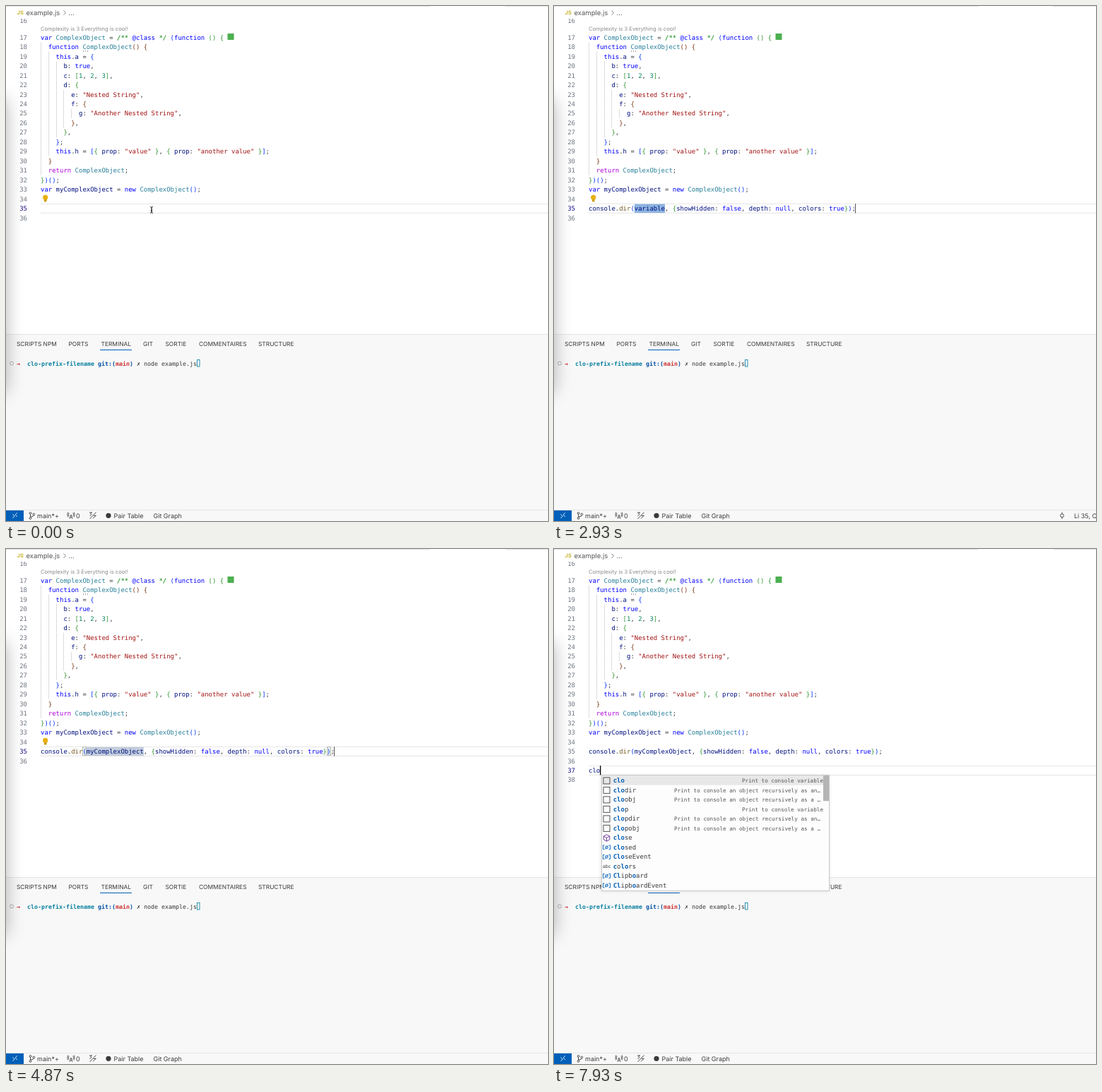
Recreate the animation shown at these times as an HTML page with a canvas. Size 767 by 730 pixels, loop 8000 ms.

```html
<!DOCTYPE html>
<html lang="en">
<head>
<meta charset="utf-8">
<title>Code editor: logging snippets</title>
<style>
  html, body { margin: 0; width: 100%; height: 100%; overflow: hidden; background: #fff; }
  canvas { display: block; }
</style>
</head>
<body>
<canvas id="stage" width="767" height="730"></canvas>
<script>
const ctx = document.getElementById('stage').getContext('2d');
const W = 767, H = 730, LOOP = 8000;
const LEFT = 49, CHAR = 5.4, LINE = 13.46, ROW = 13.5, SIZE = 8.97;
const INK = '#3b3b3b', GREY = '#6e7681', BLUE = '#0000ff', ACCENT = '#005fb8';
const BRACKETS = ['#0431fa', '#319331', '#7b3814'];

const SOURCE = `var ComplexObject = /** @class */ (function () {
  function ComplexObject() {
    this.a = {
      b: true,
      c: [1, 2, 3],
      d: {
        e: "Nested String",
        f: {
          g: "Another Nested String",
        },
      },
    };
    this.h = [{ prop: "value" }, { prop: "another value" }];
  }
  return ComplexObject;
})();
var myComplexObject = new ComplexObject();`.split('\n');

// Timelines: [start in ms, value]
const TYPED = [[0, ''], [130, 'c'], [270, 'cl'], [400, 'clo'], [600, 'clod'], [730, 'clodi'], [870, 'clodir'],
  [1400, 'variable'], [3000, 'm'], [3200, 'my'], [3400, 'myC'], [3930, 'myComplexObject']];
const TYPED_AGAIN = [[0, ''], [7000, 'c'], [7270, 'cl'], [7400, 'clo']];
const CARET = [[0, 0], [130, 1], [1270, 0], [3000, 1], [4400, 0], [4930, 1], [5330, 0], [5670, 1], [6130, 0], [6470, 1]];
const POPUP = [[0, null], [470, ['clo', 67]], [670, ['dir', 71]], [800, ['dir', 76]], [930, ['dir', 82]],
  [1400, null], [3270, ['my', 126]], [3470, ['myC', 131]], [3930, null], [7530, ['clo', 67]]];
const INSERT = 1400, EDIT = 3000, LEAVE = 5670, ENTER1 = 6470, ENTER2 = 6670;

// Suggestions: icon, label with *matched* parts, detail
const VARIABLE = 'Print to console variable';
const AS_AN = 'Print to console an object recursively as an…';
const AS_A = 'Print to console an object recursively as a …';
const MINE = ['var', '*myC*omplexObject', 'var myComplexObject: ComplexObject'];
const LISTS = {
  clo: [
    ['box', '*clo*', VARIABLE], ['box', '*clo*dir', AS_AN], ['box', '*clo*obj', AS_A],
    ['box', '*clo*p', VARIABLE], ['box', '*clo*pdir', AS_AN], ['box', '*clo*pobj', AS_A],
    ['cube', '*clo*se'], ['var', '*clo*sed'], ['var', '*Clo*seEvent'], ['abc', '*c*o*lo*rs'],
    ['var', '*Cl*ipb*o*ard'], ['var', '*Cl*ipb*o*ardEvent']
  ],
  dir: [['box', '*clodir*', AS_AN], ['box', '*clo*p*dir*', AS_AN]],
  my: [
    ['var', '*my*ComplexObject', MINE[2]],
    ...['EncryptedEvent', 'KeyMessageEvent', 'Keys', 'KeySession', 'KeyStatusMap', 'KeySystemAccess', 'QueryList', 'QueryListEvent']
      .map(name => ['var', '*M*edia' + name.replace('y', '*y*')]),
    ['var', '*M*imeT*y*pe'], ['var', '*M*imeT*y*peArray']
  ],
  myC: [MINE, ['var', '*M*ediaEn*c*r*y*ptedEvent'], ['var', '*M*ediaKe*y*SystemA*c*cess']]
};

const at = (steps, t) => steps.filter(s => s[0] <= t).pop()[1];
const lineTop = n => 37.9 + (n - 17) * LINE;
const colX = c => LEFT + c * CHAR;

function rect(x, y, w, h, color) {
  ctx.fillStyle = color;
  ctx.fillRect(x, y, w, h);
}

function frame(x, y, w, h, color) {
  ctx.strokeStyle = color;
  ctx.lineWidth = 1;
  ctx.strokeRect(x, y, w, h);
}

// Strokes an SVG path
function path(d, color = INK, width = 0.9) {
  ctx.strokeStyle = color;
  ctx.lineWidth = width;
  ctx.stroke(new Path2D(d));
}

function disc(x, y, r, color) {
  ctx.fillStyle = color;
  ctx.beginPath();
  ctx.arc(x, y, r, 0, 7);
  ctx.fill();
}

function ring(x, y, r, color = INK) {
  ctx.strokeStyle = color;
  ctx.lineWidth = 0.9;
  ctx.beginPath();
  ctx.arc(x, y, r, 0, 7);
  ctx.stroke();
}

function sans(text, x, y, size, color = INK, weight = 400) {
  ctx.font = `${weight} ${size}px Inter, sans-serif`;
  ctx.letterSpacing = '0px';
  ctx.fillStyle = color;
  ctx.fillText(text, x, y);
}

// Monospace text on a fixed pitch; returns the x after the text
function mono(text, x, y, color = INK, weight = 400, pitch = CHAR) {
  ctx.font = `${weight} ${SIZE * pitch / CHAR}px "DejaVu Sans Mono", monospace`;
  ctx.letterSpacing = '0px';
  ctx.letterSpacing = (pitch - ctx.measureText('0').width) + 'px';
  ctx.fillStyle = color;
  ctx.fillText(text, x, y);
  return x + text.length * pitch;
}

function tokenColor(token, next) {
  if (token[0] === '"') return '#a31515';
  if (/^(\/\*\*|\*\/)$/.test(token)) return '#008000';
  if (/^(var|function|this|new|true|false|null|@class)$/.test(token)) return BLUE;
  if (token === 'return') return '#af00db';
  if (token === 'ComplexObject') return '#267f99';
  if (/^\d/.test(token)) return '#098658';
  if (/^\w/.test(token)) return next === '(' ? '#795e26' : '#001080';
  return INK;
}

let depth = 0;
function code(text, n) {
  const top = lineTop(n), indent = text.search(/\S|$/);
  for (let c = 0; c < indent; c += 2) rect(Math.round(colX(c)), top, 1, LINE, '#dcdcdc');
  for (const m of text.matchAll(/"[^"]*"|\/\*\*|\*\/|@?\w+|\S/g)) {
    const token = m[0];
    let color = tokenColor(token, text[m.index + token.length]);
    if ('([{'.includes(token)) color = BRACKETS[depth++ % 3];
    if (')]}'.includes(token)) color = BRACKETS[--depth % 3];
    mono(token, colX(m.index), top + 9.9, color);
  }
}

function icon(kind, x, y) {
  if (kind === 'box') frame(x - 4.5, y - 4.5, 9, 9, '#555');
  if (kind === 'abc') sans('abc', x - 5.5, y + 2.5, 6.5);
  if (kind === 'cube') path(`M${x} ${y - 4.5}l4.3 2.2v4.8l-4.3 2.3l-4.3-2.3v-4.8zM${x - 4.3} ${y - 2.3}l4.3 2.2l4.3-2.2M${x} ${y}v4.7`, '#652d90');
  if (kind === 'var') {
    path(`M${x - 3} ${y - 3}h-2v6h2M${x + 3} ${y - 3}h2v6h-2M${x - 2.3} ${y + 2.3}l4.6-4.6`, ACCENT);
    ring(x, y, 1.9, ACCENT);
  }
}

function popup([name, x], n) {
  const items = LISTS[name], y = lineTop(n) + LINE + 0.6, w = 322, h = items.length * ROW + 2;
  ctx.save();
  ctx.shadowColor = 'rgba(0,0,0,.16)';
  ctx.shadowBlur = 5;
  rect(x, y, w, h, '#fdfdfd');
  ctx.restore();
  rect(x, y, w, ROW, '#e8e8e8');
  items.forEach(([kind, label, detail], i) => {
    const mid = y + 0.5 + ROW * (i + 0.5);
    icon(kind, x + 7.5, mid);
    let lx = x + 16.7;
    label.split('*').forEach((part, k) => {
      lx = k % 2 ? mono(part, lx, mid + 3, ACCENT, 700) : mono(part, lx, mid + 3);
    });
    if (detail) {
      const pitch = 4.6, pad = detail.includes('…') ? 12 : 8;
      mono(detail, x + w - pad - detail.length * pitch, mid + 2.6, '#555', 400, pitch);
    }
  });
  if (items.length > 10) rect(x + w - 8, y, 8, 36, '#b5b5b5');
  frame(Math.round(x) + 0.5, Math.round(y) - 0.5, w, Math.round(h), '#c8c8c8');
}

function panel() {
  rect(0, 465, W, H - 465, '#f8f8f8');
  rect(0, 465, W, 1, '#e5e5e5');
  [['SCRIPTS NPM', 15], ['PORTS', 88.5], ['TERMINAL', 134.5], ['GIT', 194], ['SORTIE', 225.5], ['COMMENTAIRES', 273], ['STRUCTURE', 357]]
    .forEach(([label, x]) => sans(label, x, 482.3, 8.4));
  rect(133, 487, 45, 1, ACCENT);

  ring(8, 506.5, 2.5, '#aaa');
  mono('→', 15, 509.5, '#cd3131', 700, 5);
  let x = 30;
  [['clo-prefix-filename ', '#067f9f', 700], ['git:(', '#0451a5', 700], ['main', '#cd3131', 700], [')', '#0451a5', 700], [' ✗ node example.js', '#333', 400]]
    .forEach(([text, color, weight]) => { x = mono(text, x, 509.5, color, weight, 5); });
  frame(270.5, 501.5, 3.5, 9.5, '#2b8fb0');
}

function statusBar(selecting) {
  rect(0, 714, W, 1, '#e5e5e5');
  rect(0, 715, 25, 15, ACCENT);
  path('M9.5 720.5l2.7 2.7l-2.7 2.7M15.8 718.5l-2.7 2.7l2.7 2.7', '#fff');
  ring(34.5, 719, 1.4);
  ring(34.5, 726, 1.4);
  ring(39.3, 720.5, 1.4);
  path('M34.5 720.5v4M39.3 722q0 2-4.5 2');
  sans('main*+', 44, 725.7, 9);
  path('M90 727l2-6l2 6M90.7 725h2.6M89.3 718.5q-2 2 0 5M94.7 718.5q2 2 0 5M87.8 717.5q-2 3.5 0 7M96.2 717.5q2 3.5 0 7', INK, 0.8);
  sans('0', 99, 725.7, 9);
  path('M118.5 727l9-9.5M118 718h4M119 720.5l2-2.5M123 726.5l4-4M124 722.5h3.5M118.5 723l3-3');
  disc(145, 722.3, 3.6, INK);
  sans('Pair Table', 152.5, 725.7, 9);
  sans('Git Graph', 208.5, 725.7, 9);
  if (selecting) {
    ring(719, 722.3, 2.4);
    path('M719 717.5v2.4M719 724.7v2.4');
    sans('Li 35, Col 21', 736, 725.7, 9);
  }
}

function header() {
  mono('16', 19.2, 23.6, GREY);
  rect(0, 0, W, 18, '#fff');
  rect(0, 0, 600, 1, '#e2e2e2');
  rect(707, 0, 60, 1, '#e2e2e2');
  sans('JS', 15.5, 12, 7.5, '#c5b52a', 700);
  sans('example.js', 28.5, 13, 9.5, '#555');
  path('M81.5 6.5l3 3.2l-3 3.2', '#777');
  sans('...', 88.5, 13, 9.5, '#555');
  sans('Complexity is 3 Everything is cool!', LEFT, 34.7, 7.6, '#8a8a8a');
  rect(313.5, 39, 9, 9, '#4caf50');
}

function draw(t) {
  const word = at(TYPED, t), inserted = t >= INSERT, again = at(TYPED_AGAIN, t);
  const text = inserted ? `console.dir(${word}, {showHidden: false, depth: null, colors: true});` : word;
  const active = t < ENTER1 ? 35 : t < ENTER2 ? 36 : 37;
  const top = lineTop(35), end = 12 + word.length;
  const selecting = inserted && t < EDIT;

  rect(0, 0, W, H, '#fff');
  header();

  const rowY = Math.round(lineTop(active));
  rect(LEFT, rowY, W, 1, '#e6e6e6');
  rect(LEFT, rowY + 13, W, 1, '#e6e6e6');
  for (let n = 17; n <= Math.max(36, active + 1); n++)
    mono(String(n), 19.2, lineTop(n) + 9.9, n === active ? '#171184' : GREY);

  if (inserted && t < LEAVE) {
    rect(colX(12), top + 0.5, word.length * CHAR, 12.5, selecting ? '#8db4e0' : '#c2cddc');
    if (!selecting)
      for (const c of [11, text.length - 2]) {
        rect(colX(c), top + 1, CHAR, 12, '#e5efe5');
        frame(Math.round(colX(c)) + 0.5, Math.round(top) + 0.5, 5, 12, '#b9b9b9');
      }
    rect(Math.round(colX(text.length)) - 1, top, 1, 13.5, '#555');
  }

  depth = 0;
  SOURCE.forEach((line, i) => code(line, 17 + i));
  code(text, 35);
  code(again, 37);
  for (let x = 109; x < 117; x += 3) rect(x, 63.5, 1, 1, '#555');

  if (t >= 1000 && !inserted) {
    let wave = 'M49 292.5';
    for (let i = 0; i < 8; i++) wave += 'l2-1.6l2 1.6';
    path(wave, '#3a7fc4', 0.8);
  }

  if (t < 7470) {
    disc(55.7, 271.3, 3.6, '#e8b012');
    rect(54, 274, 3.4, 3.5, '#d09a10');
  }

  if (t < 130) path('M204 284.5q2 0 2 1.5v6q0 1.5-2 1.5M208 284.5q-2 0-2 1.5v6q0 1.5 2 1.5M204.8 290h2.4', '#222');

  if (at(CARET, t)) {
    const col = active > 35 ? (active === 37 ? again.length : 0)
      : !inserted || t >= LEAVE ? text.length : end;
    rect(Math.round(colX(col)), lineTop(active), 1.3, 13.3, '#000');
  }

  panel();
  statusBar(selecting);

  const open = at(POPUP, t);
  if (open) popup(open, active);

  // Soft shadow along the left edge
  ctx.save();
  ctx.shadowColor = 'rgba(0,0,0,.32)';
  ctx.shadowBlur = 26;
  rect(-30, 133, 29, 414, '#000');
  ctx.restore();
}

ctx.textRendering = 'geometricPrecision';
const start = performance.now();
(function tick() {
  draw((performance.now() - start) % LOOP);
  requestAnimationFrame(tick);
})();
</script>
</body>
</html>
```
